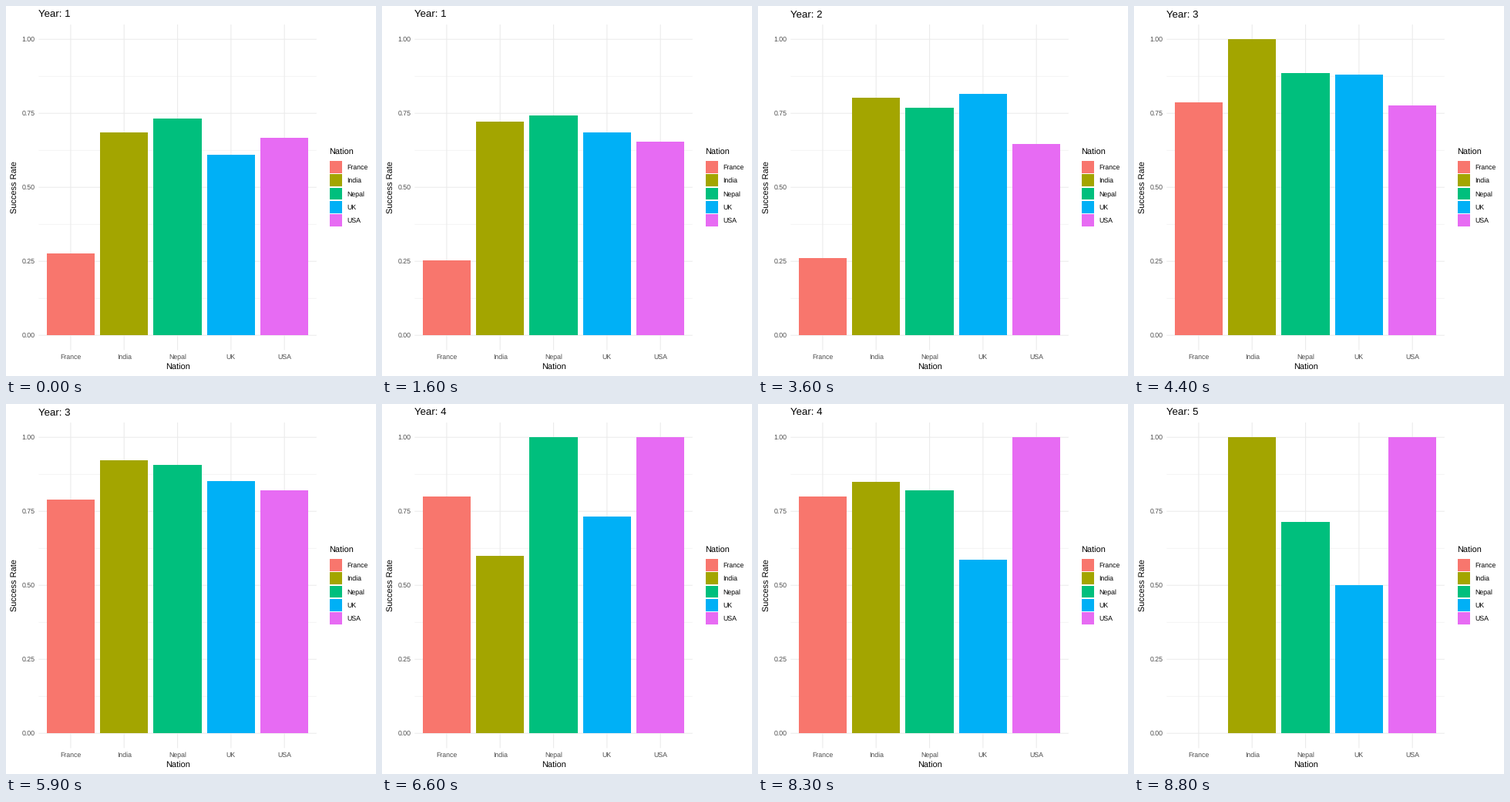
Recreate the animation shown at these times as a matplotlib script. Size 480 by 480 pixels, loop 10 s.

```python
import matplotlib.pyplot as plt
from matplotlib.animation import FuncAnimation
from matplotlib.patches import Rectangle

SIZE, DPI = 480, 80
PT = 72 / DPI  # points per pixel
HOLD, TWEEN = 12, 10
PERIOD = HOLD + TWEEN

NATIONS = ["France", "India", "Nepal", "UK", "USA"]
COLORS = ["#F8766D", "#A3A500", "#00BF7D", "#00B0F6", "#E76BF3"]
# One row per year; None means no data for that year.
RATES = [
    [0.2766, 0.6850, 0.7325, 0.6100, 0.6667],
    [0.2143, 0.7845, 0.7570, 0.8085, 0.6345],
    [0.7870, 1.0000, 0.8860, 0.8805, 0.7766],
    [0.8000, 0.6000, 1.0000, 0.7333, 1.0000],
    [None, 1.0000, 0.7143, 0.5000, 1.0000],
]

LEFT, RIGHT, TOP, BOTTOM = 42.3, 402.8, 24.0, 446.4
ZERO, UNIT = 427.2, 384.0
STEP = (RIGHT - LEFT) / 5.2
CENTERS = [LEFT + STEP * (0.6 + i) for i in range(len(NATIONS))]
BAR = 0.9 * STEP

plt.rcParams["font.family"] = "Liberation Sans"
plt.rcParams["text.hinting"] = "none"

fig = plt.figure(figsize=(SIZE / DPI, SIZE / DPI), dpi=DPI, facecolor="white")
ax = fig.add_axes([0, 0, 1, 1])
ax.set_xlim(0, SIZE)
ax.set_ylim(SIZE, 0)
ax.axis("off")


def label(x, y, text, size, color="black", **kwargs):
    return ax.text(x, y, text, fontsize=size * PT, color=color,
                   va="baseline", **kwargs)


def grid_line(xs, ys, width):
    ax.plot(xs, ys, color="#EBEBEB", lw=width * PT, snap=False,
            solid_capstyle="butt", zorder=1)


def box(x, y, w, h, color):
    return ax.add_patch(Rectangle((x, y), w, h, facecolor=color, lw=0, zorder=2))


def ease(x):
    """Cubic in and out."""
    return 4 * x ** 3 if x < 0.5 else 1 - 4 * (1 - x) ** 3


for i in range(9):
    y = ZERO - UNIT * i / 8
    grid_line([LEFT, RIGHT], [y, y], 0.53 if i % 2 else 1.07)
    if i % 2 == 0:
        label(37.4, y + 3.2, f"{i / 8:.2f}", 8.8, "#4D4D4D", ha="right")

for x, name in zip(CENTERS, NATIONS):
    grid_line([x, x], [TOP, BOTTOM], 1.07)
    label(x, 458.4, name, 8.8, "#4D4D4D", ha="center")

label((LEFT + RIGHT) / 2, 471.4, "Nation", 11, ha="center")
ax.text(13.4, (TOP + BOTTOM) / 2, "Success Rate", fontsize=11 * PT, rotation=90,
        rotation_mode="anchor", ha="center", va="baseline")
title = label(LEFT, 15.2, "", 13.2)

label(419.3, 193, "Nation", 11)
for i, (name, color) in enumerate(zip(NATIONS, COLORS)):
    y = 208.9 + 17.28 * i
    box(420, y - 7.9, 16, 15.9, color)
    label(442, y + 3.2, name, 8.8)

bars = [box(x - BAR / 2, ZERO, BAR, 0, c) for x, c in zip(CENTERS, COLORS)]


def draw(frame):
    year, step = divmod(frame, PERIOD)
    now = RATES[year]
    later = RATES[min(year + 1, len(RATES) - 1)]
    t = ease(max(0, step - HOLD + 1) / (TWEEN + 1))
    for bar, a, b in zip(bars, now, later):
        bar.set_visible(a is not None)
        if a is not None:
            # A bar without a next value keeps its height until it vanishes.
            rate = a if b is None else a + (b - a) * t
            bar.set_y(ZERO - UNIT * rate)
            bar.set_height(UNIT * rate)
    title.set_text(f"Year: {year + 1}")
    return [*bars, title]


anim = FuncAnimation(fig, draw, frames=100, interval=100, repeat=True,
                     repeat_delay=0)
plt.show()
```
